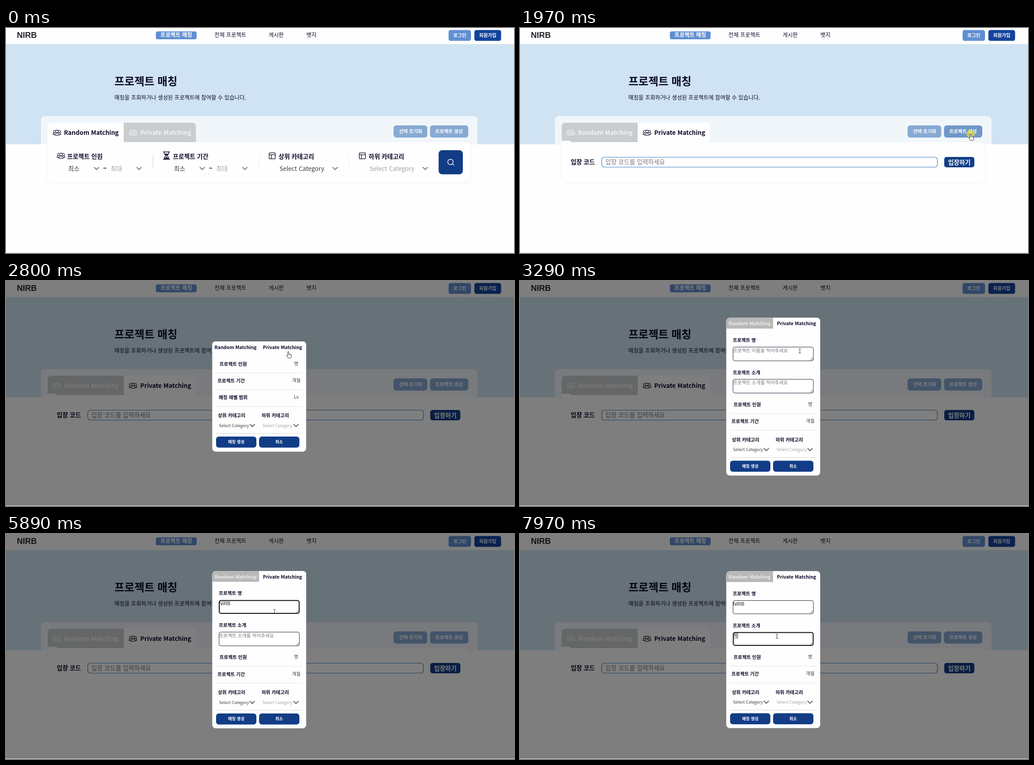
Write an HTML page that moves like this. It is 1122 px wide and 499 px high and loops after 8000 ms.

```html
<!DOCTYPE html>
<html lang="ko">
<head>
<meta charset="utf-8">
<title>프로젝트 매칭</title>
<style>
html, body { margin: 0; width: 100%; height: 100%; overflow: hidden; background: #fefefe; }
svg { display: block; width: 1122px; height: 499px; }
text { font-family: "Noto Sans CJK KR", "Noto Sans CJK JP", "Noto Sans CJK", sans-serif; fill: currentColor; white-space: pre; }
.b { font-weight: 700; }
.latin { font-family: "Liberation Sans", Arial, sans-serif; }
.line { fill: none; stroke: currentColor; stroke-linecap: round; stroke-linejoin: round; }
.tab { --bg: #cacdd0; color: #f1f2f3; }
.modal .tab { --bg: #b8b8b8; color: #ececec; }
.tab.on, .modal .tab.on { --bg: #fefefe; color: #0a0a28; }
.tab > .bg { fill: var(--bg); }
.soft { fill: #87aad3; }
.soft.hover { fill: #7097c9; }
.field { fill: #fff; stroke: #22223f; stroke-width: 1; }
.field.focus { stroke: #0a0a14; stroke-width: 2; }
</style>
</head>
<body>
<svg id="stage" viewBox="0 0 1122 499"></svg>
<script>
const LOOP = 8000;
const NAVY = '#123d86', INK = '#0a0a28', GREY = '#a3a3a8', DARK = '#3c3c46';
const NAME = 'NIRB';

// Text placed by its left edge and the middle of its line.
const text = (x, cy, size, str, color = INK, cls = '', id = '') =>
  `<text x="${x}" y="${(cy + size * 0.37).toFixed(2)}" font-size="${size}" color="${color}" class="${cls}" id="${id}">${str}</text>`;
const bold = (x, cy, size, str, color) => text(x, cy, size, str, color, 'b');
const rect = (x, y, w, h, r, attrs) =>
  `<rect x="${x}" y="${y}" width="${w}" height="${h}" rx="${r}" ${attrs}/>`;
const fill = c => `fill="${c}"`;
const line = (d, color, width, x = 0, y = 0) =>
  `<path class="line" d="${d}" color="${color}" stroke-width="${width}" transform="translate(${x} ${y})"/>`;
const group = (id, body, attrs = '') => `<g id="${id}" ${attrs}>${body}</g>`;
const rule = (y, color = '#e3e3e6') => rect(464, y, 190, 1, 0, fill(color));
const chevron = (x, y, w = 1.5) => line('M-5 -2.6L0 2.6L5 -2.6', '#55555c', w, x, y);

const people = (x, y, color = 'currentColor') => line(
  'M-3-2.6a3 3 0 1 0 6 0a3 3 0 1 0-6 0M-4.8 5.6V3.8Q-4.4 1 0 1T4.8 3.8V5.6Z' +
  'M-3.6-4.6A2.5 2.5 0 1 0-4-.4M3.6-4.6A2.5 2.5 0 1 1 4-.4' +
  'M-5-.2Q-8.4.2-8.4 2.6V4.4H-5M5-.2Q8.4.2 8.4 2.6V4.4H5', color, 1.1, x, y);
const hourglass = (x, y) => line(
  'M-7-8.3H7M-7 8.3H7M-5-8V-5Q-4.6-2.4-1 0Q-4.6 2.4-5 5V8M5-8V-5Q4.6-2.4 1 0Q4.6 2.4 5 5V8' +
  'M-3-3.6H3L0-1ZM-3.4 6.4L0 3L3.4 6.4Z', INK, 1.5, x, y);
const board = (x, y) => line(
  'M-5-6.7H5Q6.7-6.7 6.7-5V5Q6.7 6.7 5 6.7H-5Q-6.7 6.7-6.7 5V-5Q-6.7-6.7-5-6.7ZM-6.7-2.4H6.7M-2-2.4V6.7', INK, 1.3, x, y);

function tab(id, x, y, w, h, r, left, body) {
  const d = left
    ? `M${x + w} ${y}V${y + h}H${x}V${y + r}Q${x} ${y} ${x + r} ${y}Z`
    : `M${x} ${y}V${y + h}H${x + w}V${y + r}Q${x + w} ${y} ${x + w - r} ${y}Z`;
  return group(id, `<path class="bg" d="${d}"/>` + body, 'class="tab"');
}
const tabText = (x, y, size, str) => bold(x, y, size, str, 'currentColor');

const header =
  rect(0, 0, 1122, 35.5, 0, fill('#fefefe')) +
  text(24, 15.5, 18, NAME, '#26262e', 'b latin') +
  rect(331, 7.5, 90, 17.5, 4, fill('#608fd2')) +
  bold(341, 16, 12.1, '프로젝트 매칭', '#fff') +
  text(460.5, 16, 12.1, '전체 프로젝트') + text(580, 16, 12.1, '게시판') + text(663.5, 16, 12.1, '뱃지') +
  rect(977.5, 4.5, 49.5, 24, 4.5, fill('#608fd2')) + bold(988, 16, 10.3, '로그인', '#fff') +
  rect(1034.5, 4.5, 59, 24, 4.5, fill('#12439c')) + bold(1045, 16, 10.3, '회원가입', '#fff');

const hero =
  rect(0, 35.5, 1122, 222.5, 0, fill('#d0e3f2')) +
  bold(239.5, 118, 24, '프로젝트 매칭') +
  text(239.5, 155, 12.1, '매칭을 조회하거나 생성된 프로젝트에 참여할 수 있습니다.') +
  `<path d="M77 258V205Q77 195.500 86.500 195.500H1032Q1041.500 195.500 1041.500 205V258Z" fill="#f1f6fb"/>`;

const card =
  rect(91.5, 253.5, 936, 90, 10, 'fill="none" stroke="#000" stroke-opacity=".025" stroke-width="3"') +
  rect(92, 253, 935, 89.5, 10, fill('#fefefe')) + rect(92, 250, 20, 14, 0, fill('#fefefe'));

const tabs =
  tab('tabR', 92, 210, 168, 43, 9, true, people(112.500, 232) + tabText(128, 232.3, 13.5, 'Random Matching')) +
  tab('tabP', 260, 210, 159.5, 43, 9, false, people(280.500, 232) + tabText(296.5, 232.3, 13.5, 'Private Matching'));

const tools =
  rect(856, 216, 74.5, 27, 6, 'class="soft"') + bold(868, 229.5, 10.5, '선택 초기화', '#fff') +
  rect(936.5, 216, 84.5, 27, 6, 'class="soft" id="create"') + bold(948, 229.5, 10.5, '프로젝트 생성', '#fff');

const range = x =>
  text(x, 312, 13.5, '최소', DARK) + chevron(x + 62.5, 311.5) + bold(x + 77, 311, 13.5, '~') +
  text(x + 93.5, 312, 13.5, '최대', GREY) + chevron(x + 156.5, 311.5);
const choice = (x, label, color) =>
  board(x + 8, 283.5) + bold(x + 22, 285, 13.5, label) +
  text(x + 24, 312, 13.5, 'Select Category', color) + chevron(x + 147, 311.5);
const randomForm =
  people(121.5, 283, INK) + bold(135, 285, 13.5, '프로젝트 인원') + range(137.5) +
  hourglass(354.5, 283) + bold(368.5, 285, 13.5, '프로젝트 기간') + range(371) +
  choice(580, '상위 카테고리', DARK) + choice(779, '하위 카테고리', GREY) +
  rect(324, 282, 1.2, 30, 0, fill('#d9d9dc')) +
  rect(558, 282, 1, 30, 0, fill('#ececee')) + rect(756.5, 282, 1, 30, 0, fill('#ececee')) +
  rect(955.5, 271, 53.5, 53.5, 8, fill(NAVY)) +
  line('M-6.300-.5a6 6 0 1 0 12 0a6 6 0 1 0-12 0M4.200 4L7 6.800', '#fff', 1.4, 982, 297.5);

const privateForm =
  bold(112, 296.5, 13.5, '입장 코드') +
  rect(180.5, 286.5, 741.5, 22, 6, 'fill="#fff" stroke="#3f7cbd" stroke-width="1.2"') +
  text(188.5, 297, 13.5, '입장 코드를 입력하세요', '#77777c') +
  rect(188.5, 290, 1, 15, 0, 'id="caret" fill="#222"') +
  rect(937, 286, 66.5, 23, 5, fill(NAVY)) + bold(945.5, 298, 13.5, '입장하기', '#fff');

// Rows shared by both dialog pages.
const sizeRows =
  bold(471.5, 184, 10.45, '프로젝트 인원') + text(636, 183, 10.45, '명', DARK) + rule(203.5) +
  bold(467, 221.5, 10.45, '프로젝트 기간') + text(631.5, 220.5, 10.45, '개월', DARK) + rule(240.5);
const button = (x, label, tx) => rect(x, 345, 89, 24.5, 6, fill(NAVY)) + bold(tx, 357, 9.1, label, '#fff');
const endRows =
  bold(468, 298.5, 10.45, '상위 카테고리') + bold(564.5, 298.5, 10.45, '하위 카테고리') +
  text(470.5, 320.5, 9, 'Select Category', DARK) + chevron(544, 320.5, 1.8) +
  text(566.5, 320.5, 9, 'Select Category', GREY) + chevron(640.500, 320.5, 1.8) +
  rule(337.5, '#d8d8dc') + button(464, '매칭 생성', 490.5) + button(559, '취소', 595);
const dialogTabs = (key, y) =>
  tab('r' + key, 455.5, y, 103.5, 24, 8, true, tabText(460.5, y + 12.7, 10.4, 'Random Matching')) +
  tab('p' + key, 559, y, 104, 24, 8, false, tabText(567.5, y + 12.7, 10.4, 'Private Matching'));

const randomDialog =
  rect(455.5, 134, 207.5, 244.5, 8, fill('#fefefe')) + dialogTabs('Dlg1', 134) + sizeRows +
  bold(470, 258.5, 10.45, '매칭 레벨 범위') + text(636, 257.5, 10.45, 'Lv', DARK) + rule(278) + endRows;

const field = (id, y, hint) =>
  rect(470.5, y, 177.5, 30.5, 4, `class="field" id="${id}"`) +
  line('M0 0L-6 6M0 3.500L-2.500 6', '#444', 0.9, 647, 0).replace('<path', `<path id="${id}Grip"`) +
  text(470.500, y + 7.2, 10.45, hint, '#77777c', '', id + 'Hint');
const privateDialog =
  rect(455.5, 81.5, 207.5, 350, 8, 'fill="#fefefe" id="sheet"') +
  group('top', dialogTabs('Dlg2', 81.5) + bold(470, 131, 10.45, '프로젝트 명') +
    field('f1', 146.5, '프로젝트 이름을 적어주세요') + text(470.5, 154, 10.4, '', '#222', 'latin', 'typed1')) +
  group('mid', bold(470, 202.800, 10.45, '프로젝트 소개') +
    field('f2', 218, '프로젝트 소개를 적어주세요') + text(471, 225.2, 10.4, '', '#222', '', 'typed2') +
    rect(471.5, 220, 9.5, 11, 0, 'id="ime" fill="none" stroke="#333" stroke-width=".8"')) +
  group('low', `<g transform="translate(0 90)">${sizeRows}</g><g transform="translate(0 53.5)">${endRows}</g>`);

const pointer =
  `<circle id="press" r="9" fill="#f0e62a" fill-opacity=".65"/>` +
  group('arrow', '<path d="M0 0V10L2.300 8L4 11.500L5.600 10.800L4 7.400H7.200Z" fill="#fff" stroke="#222" stroke-width=".7"/>') +
  group('hand', '<path d="M-1.200 1Q-1.200-.3 0-.3T1.200 1V5Q2.600 4.400 3.400 5.500Q4.800 5 5.400 6.100Q7.200 5.800 7.200 7.600V10Q7 12 6 14H-.6Q-1.400 12-3.600 9Q-4 7.300-2.700 7.400L-1.200 8.800Z" fill="#fff" stroke="#222" stroke-width=".9"/><path d="M1.200 5V8M3.400 5.500V8M5.400 6.100V8" stroke="#222" stroke-width=".6"/>') +
  group('beam', '<path d="M-2.500-4.700H-.6L0-4L.6-4.700H2.500M0-4V4M-2.500 4.700H-.6L0 4L.6 4.700H2.500" fill="none" stroke="#222" stroke-width=".9"/>');

document.getElementById('stage').innerHTML =
  hero + header + tabs + card + tools + group('formR', randomForm) + group('formP', privateForm) +
  rect(0, 0, 1122, 498, 0, 'id="shade" fill="#000" fill-opacity=".5"') +
  group('dlgR', randomDialog, 'class="modal"') + group('dlgP', privateDialog, 'class="modal"') +
  rect(0, 498, 1122, 1, 0, fill('#e4e4e6')) + group('pointer', pointer);

const el = {};
document.querySelectorAll('[id]').forEach(e => { if (e.id) el[e.id] = e; });
const show = (id, on) => { el[id].style.display = on ? '' : 'none'; };
const set = (id, attrs) => { for (const k in attrs) el[id].setAttribute(k, attrs[k]); };
const shift = (id, x, y) => set(id, { transform: `translate(${x} ${y})` });

// start, end, steps, goal x, goal y
const START = [1003, 484];
const MOVES = [
  [130, 750, 10, 388, 238],
  [1350, 1630, 5, 995, 235],
  [2110, 2530, 7, 652, 167],
  [2600, 2870, 4, 618, 155],
  [3490, 3940, 7, 593, 172],
  [5960, 6380, 6, 568, 218.5],
  [6710, 6710, 1, 567.5, 227]
];
const PRESSES = [[1020, 1220], [1840, 2040], [3170, 3290], [4040, 4240], [6440, 6640]];
const TYPED1 = [[4900, 1], [5100, 2], [5230, 3], [5360, 4]];
const TYPED2 = [[7120, 'g'], [7240, 'gu'], [7640, 'g'], [7740, ''], [7860, 'ㅎ'], [7970, '혀']];

const latest = (steps, t, none) => steps.reduce((v, [at, val]) => t >= at ? val : v, none);

function cursorAt(t) {
  let [x, y] = START;
  for (const [t0, t1, n, gx, gy] of MOVES) {
    if (t < t0) break;
    const step = n > 1 ? (t1 - t0) / (n - 1) : 1;
    const p = Math.min(1, (Math.floor((t - t0) / step + 1e-6) + 1) / n);
    const e = p * p * (3 - 2 * p);
    x += (gx - x) * e;
    y += (gy - y) * e;
  }
  return [x, y];
}

function render(t) {
  const [x, y] = cursorAt(t);
  const over = (x0, y0, x1, y1) => t >= 130 && x >= x0 && x < x1 && y >= y0 && y < y1;
  const priv = t >= 1220, modal = t >= 2040, modalPriv = t >= 3290;
  const free = !modal;

  const onTabP = free && over(260, 210, 420, 253);
  const onTabR = free && over(92, 210, 260, 253);
  const onCreate = free && over(936, 216, 1021, 243);
  const onDlgTab = modal && !modalPriv && over(559, 134, 663, 158);
  const onField = modalPriv && (over(470, 146, 648, 177) || over(470, 217, 648, 248));

  el.tabR.classList.toggle('on', !priv || onTabR);
  el.tabP.classList.toggle('on', priv || onTabP);
  el.create.classList.toggle('hover', onCreate);
  show('formR', !priv);
  show('formP', priv);
  show('caret', t < 1770);

  show('shade', modal);
  show('dlgR', modal && !modalPriv);
  show('dlgP', modalPriv);
  el.rDlg1.classList.add('on');
  el.pDlg1.classList.toggle('on', onDlgTab);
  el.pDlg2.classList.add('on');

  // Each field loses a pixel of height at its first letter; the dialog stays centred.
  const a = t >= 4900 ? 1 : 0, b = t >= 7120 ? 1 : 0, k = a + b;
  set('sheet', { y: 81.5 + k / 2, height: 350 - k });
  shift('top', 0, k / 2);
  shift('mid', 0, k / 2 - a);
  shift('low', 0, -k / 2);

  const focus = t >= 6440 ? 2 : t >= 4040 ? 1 : 0;
  [['f1', 146.5, a, 1], ['f2', 218, b, 2]].forEach(([id, top, less, n]) => {
    const on = focus === n, inset = on ? 0.5 : 0;
    el[id].classList.toggle('focus', on);
    set(id, { x: 470.5 + inset, y: top + inset, width: 177.5 - 2 * inset, height: 30.5 - less - 2 * inset });
    shift(id + 'Grip', 647, top + 23 - less);
  });
  const typed2 = latest(TYPED2, t, '');
  el.typed1.textContent = NAME.slice(0, latest(TYPED1, t, 0));
  el.typed2.textContent = typed2;
  el.typed2.classList.toggle('latin', t < 7860);
  show('f1Hint', !a);
  show('f2Hint', !typed2);
  show('ime', t >= 7860);

  const hand = onTabP || onTabR || onCreate || onDlgTab;
  show('pointer', t >= 130);
  shift('pointer', x, y);
  show('press', PRESSES.some(([on, off]) => t >= on && t < off));
  show('hand', hand);
  show('beam', onField);
  show('arrow', !hand && !onField);
}

const begin = performance.now();
function frame() {
  render((performance.now() - begin) % LOOP);
  requestAnimationFrame(frame);
}
frame();
</script>
</body>
</html>
```
